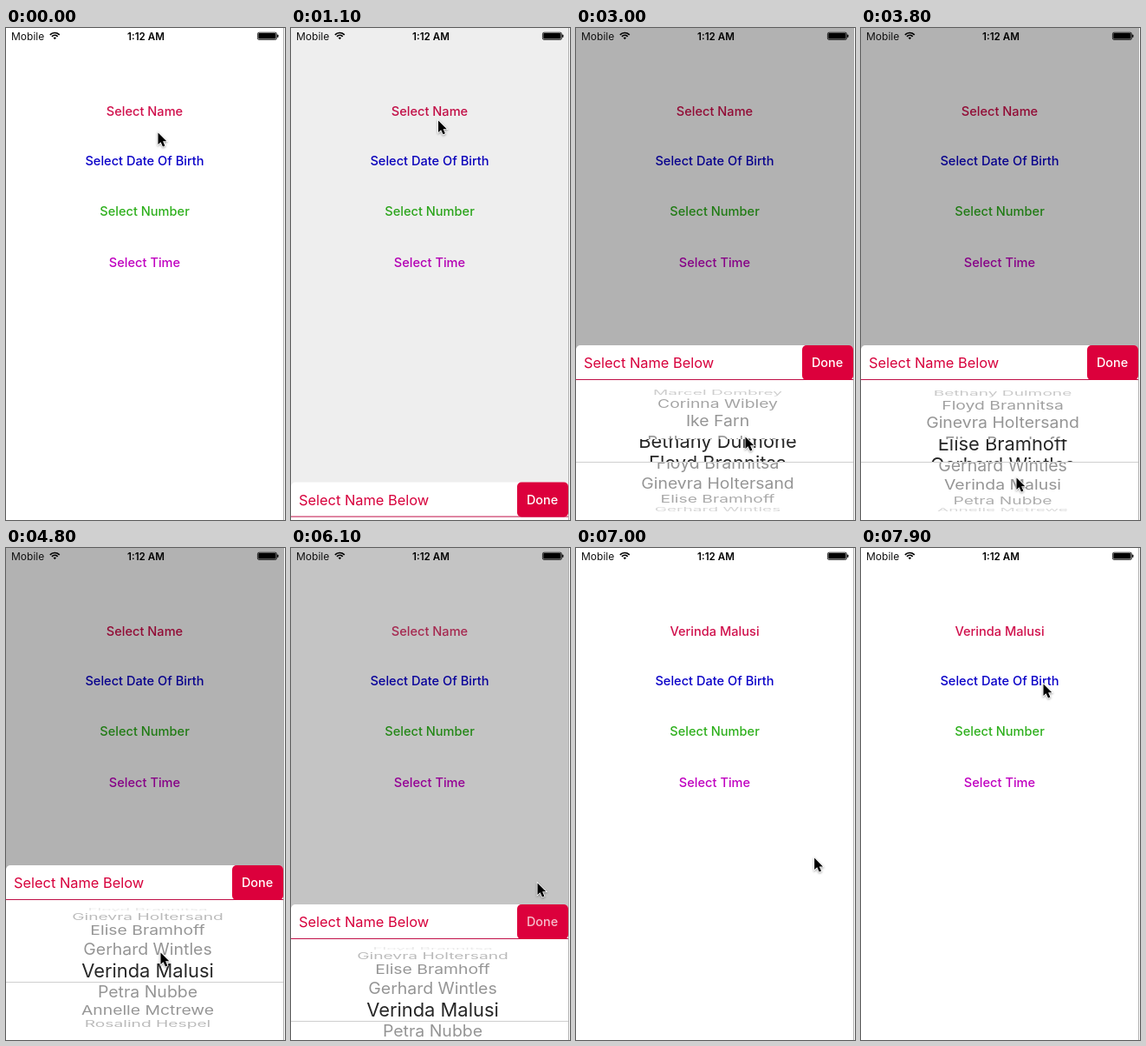
Recreate the animation shown at these times as an HTML page with a canvas. Size 322 by 566 pixels, loop 8000 ms.

```html
<!DOCTYPE html>
<html lang="en">
<head>
<meta charset="utf-8">
<title>Picker demo</title>
<style>
html, body { margin: 0; width: 322px; height: 566px; overflow: hidden; background: #fff; }
canvas { display: block; width: 322px; height: 566px; }
</style>
</head>
<body>
<canvas id="stage"></canvas>
<script>
const W = 322, H = 566, SCREEN = 320, LOOP = 8000, STEP = 100;
const FONT = 'Inter, Roboto, "Liberation Sans", sans-serif';
const RED = '#dc003c';
const SHEET_TOP = 365, HEADER = 40;
const PICK = { x: 163.5, y: 486, radius: 71.3, angle: 20.1 * Math.PI / 180, top: 473, bottom: 499 };
const NAMES = [
  'Marcel Dombrey', 'Corinna Wibley', 'Ike Farn', 'Bethany Dulmone',
  'Floyd Brannitsa', 'Ginevra Holtersand', 'Elise Bramhoff', 'Gerhard Wintles',
  'Verinda Malusi', 'Petra Nubbe', 'Annelle Mctrewe', 'Rosalind Hespel'
];
const CHOSEN = 8;

// [time, x, y] of the pointer tip
const POINTER = [
  [0, 175, 120], [700, 165, 92], [1000, 165, 92], [1800, 270, 417],
  [2300, 200, 546], [3000, 195, 470], [3800, 179, 517], [4500, 178, 465],
  [4800, 178, 465], [5500, 284, 385], [6800, 284, 385], [7700, 210, 156]
];
// [time, row] of the wheel
const WHEEL = [[2300, 0], [3000, 3.42], [3800, 6.33], [4600, 8]];

const canvas = document.getElementById('stage');
const ctx = canvas.getContext('2d');
const dpr = window.devicePixelRatio || 1;
canvas.width = W * dpr;
canvas.height = H * dpr;

const clamp = v => Math.max(0, Math.min(1, v));
const ease = v => { v = clamp(v); return v * v * (3 - 2 * v); };
const ramp = (t, start, length) => ease((t - start) / length);

function pointerAt(t) {
  let i = 0;
  while (i < POINTER.length - 2 && t >= POINTER[i + 1][0]) i++;
  const [t0, x0, y0] = POINTER[i], [t1, x1, y1] = POINTER[i + 1];
  const k = ramp(t, t0, t1 - t0);
  return [x0 + (x1 - x0) * k, y0 + (y1 - y0) * k];
}

// Smooth curve through the wheel keys, at rest on both ends
function wheelAt(t) {
  const last = WHEEL.length - 1;
  if (t <= WHEEL[0][0]) return WHEEL[0][1];
  if (t >= WHEEL[last][0]) return WHEEL[last][1];
  let i = 0;
  while (t >= WHEEL[i + 1][0]) i++;
  const slope = n => n === 0 || n === last ? 0 :
    (WHEEL[n + 1][1] - WHEEL[n - 1][1]) / (WHEEL[n + 1][0] - WHEEL[n - 1][0]);
  const [t0, a] = WHEEL[i], [t1, b] = WHEEL[i + 1];
  const d = t1 - t0, u = (t - t0) / d, v = 1 - u;
  return a * v * v * (1 + 2 * u) + b * u * u * (3 - 2 * u) +
    d * u * v * (slope(i) * v - slope(i + 1) * u);
}

function text(str, x, y, size, color, { weight = 400, align = 'center', alpha = 1 } = {}) {
  ctx.save();
  ctx.globalAlpha *= alpha;
  ctx.font = `${weight} ${size}px ${FONT}`;
  ctx.textAlign = align;
  ctx.fillStyle = color;
  ctx.fillText(str, x, y);
  ctx.restore();
}

function rounded(x, y, w, h, r, color) {
  ctx.beginPath();
  ctx.roundRect(x, y, w, h, r);
  ctx.fillStyle = color;
  ctx.fill();
}

function drawStatus() {
  text('Mobile', 6, 13.5, 12, '#111', { align: 'left' });
  text('1:12 AM', 161.5, 13.5, 11.6, '#000', { weight: 600 });

  ctx.strokeStyle = ctx.fillStyle = '#000';
  ctx.lineWidth = 1.7;
  for (const r of [4.6, 7.5]) {
    ctx.beginPath();
    ctx.arc(56.3, 13, r, -Math.PI * 0.76, -Math.PI * 0.24);
    ctx.stroke();
  }
  ctx.beginPath();
  ctx.moveTo(56.3, 13.2);
  ctx.arc(56.3, 13, 2.4, -Math.PI * 0.76, -Math.PI * 0.24);
  ctx.fill();

  ctx.lineWidth = 0.8;
  ctx.beginPath();
  ctx.roundRect(290.4, 5.2, 22, 8.2, 1.6);
  ctx.stroke();
  rounded(291.3, 6, 20.2, 6.6, 0.8, '#000');
  rounded(313.1, 7.6, 1.3, 3.4, 0.7, '#000');
}

function drawButtons(t) {
  const label = (str, y, color, alpha = 1) =>
    text(str, 160, y, 14.6, color, { weight: 500, alpha });
  const pressed = t >= 800 && t < 1000 ? 0.3 : 1;
  label('Select Name', 100.8, '#d0104c', pressed * (1 - ramp(t, 6050, 200)));
  label(NAMES[CHOSEN], 100.8, '#d0104c', ramp(t, 6210, 420));
  label('Select Date Of Birth', 158.3, '#0a00c8');
  label('Select Number', 215.6, '#2fb01e');
  label('Select Time', 274.6, '#c000c0');
}

function drawRows(row, size, selected) {
  NAMES.forEach((name, i) => {
    const a = (i - row) * PICK.angle;
    if (Math.abs(a) > 1.45) return;
    const c = Math.cos(a);
    ctx.save();
    ctx.translate(PICK.x, PICK.y + PICK.radius * Math.sin(a));
    ctx.scale(0.97 + 0.03 * c, c);
    text(name, 0, size * 0.365, size, '#000',
      { alpha: selected ? 0.85 : 0.42 * Math.min(1, 1.3 * c) });
    ctx.restore();
  });
}

function clipped(y0, y1, draw) {
  ctx.save();
  ctx.beginPath();
  ctx.rect(0, y0, SCREEN, y1 - y0);
  ctx.clip();
  draw();
  ctx.restore();
}

function drawSheet(t, shift) {
  const bottom = SHEET_TOP + HEADER;
  ctx.save();
  ctx.translate(0, shift);
  rounded(0, SHEET_TOP, SCREEN, H - SHEET_TOP, [5, 5, 0, 0], '#fff');

  const row = wheelAt(t);
  clipped(bottom, PICK.top, () => drawRows(row, 19.5, false));
  clipped(PICK.bottom, H, () => drawRows(row, 19.5, false));
  clipped(PICK.top, PICK.bottom, () => drawRows(row, 21.9, true));
  ctx.fillStyle = '#cfcfcf';
  ctx.fillRect(0, PICK.bottom, SCREEN, 1);

  text('Select Name Below', 9, 391, 16.4, '#d7003c', { align: 'left' });
  ctx.fillStyle = '#c01048';
  ctx.fillRect(0, bottom - 1, SCREEN, 1);
  rounded(261, SHEET_TOP, 59, HEADER, 5, RED);
  const held = t >= 5800 && t < 6400;
  text('Done', 290, 390.3, 14.4, '#fff', { weight: 500, alpha: held ? 0.75 : 1 });
  ctx.restore();
}

function drawPointer(x, y) {
  ctx.save();
  ctx.translate(x, y);
  ctx.beginPath();
  [[0.5, 0.5], [0.5, 14], [3.6, 11.2], [6, 16.4], [8.4, 15.4], [6.1, 10.3], [10.3, 10.3]]
    .forEach(([px, py]) => ctx.lineTo(px, py));
  ctx.closePath();
  ctx.shadowColor = 'rgba(0,0,0,.4)';
  ctx.shadowBlur = 2.5 * dpr;
  ctx.shadowOffsetY = dpr;
  ctx.strokeStyle = '#fff';
  ctx.lineWidth = 1.6;
  ctx.stroke();
  ctx.shadowColor = 'transparent';
  ctx.fillStyle = '#000';
  ctx.fill();
  ctx.restore();
}

function draw(t) {
  const open = ramp(t, 950, 500) - ramp(t, 5950, 490);
  ctx.setTransform(dpr, 0, 0, dpr, 0, 0);
  ctx.fillStyle = '#fff';
  ctx.fillRect(0, 0, W, H);
  drawButtons(t);
  if (open > 0) {
    ctx.fillStyle = `rgba(0,0,0,${0.3 * open})`;
    ctx.fillRect(0, 0, SCREEN, H);
    drawSheet(t, (H - SHEET_TOP) * (1 - open));
  }
  drawStatus();
  ctx.fillStyle = '#b0b0b0';
  ctx.fillRect(SCREEN, 0, 1, H);
  drawPointer(...pointerAt(t));
}

function tick() {
  const t = performance.now() % LOOP;
  draw(Math.floor(t / STEP) * STEP);
  requestAnimationFrame(tick);
}
tick();
</script>
</body>
</html>
```
